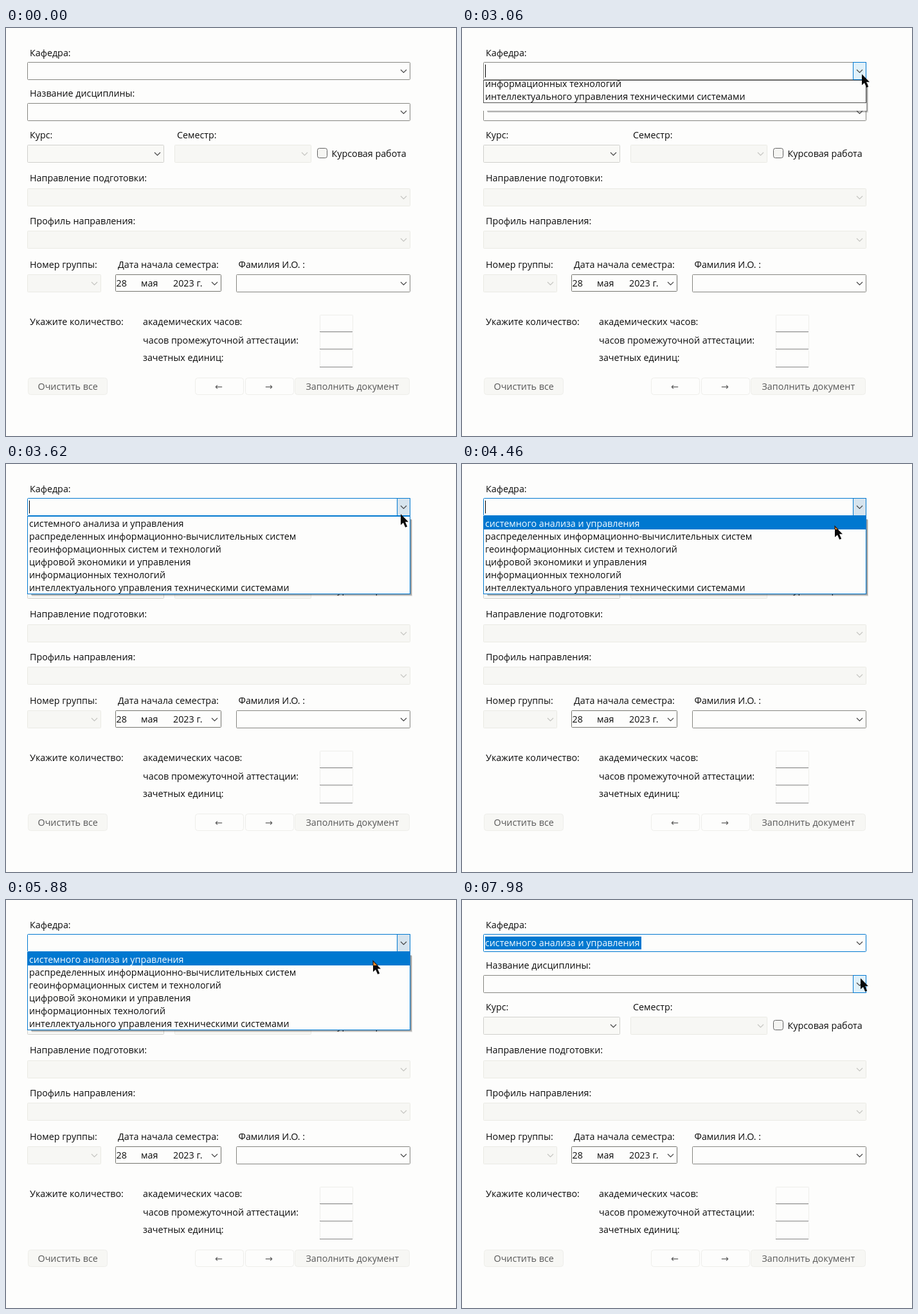
Recreate the animation shown at these times as an HTML page. Size 700x636 px, loop 8000 ms.

```html
<!DOCTYPE html>
<html lang="ru">
<head>
<meta charset="utf-8">
<style>
  html, body { margin: 0; width: 100%; height: 100%; overflow: hidden; background: #fdfdfc; }
  svg { display: block; width: 700px; height: 636px; }
  text { font: 14.3px "Open Sans", "Noto Sans", "DejaVu Sans", sans-serif; fill: #0c0c0c; white-space: pre; }
  .dim { fill: #585858; }
  .inv { fill: #f6fbff; }
</style>
</head>
<body>
<svg id="stage" viewBox="0 0 700 636" xmlns="http://www.w3.org/2000/svg"></svg>
<script>
const LOOP = 8000;
const BG = '#fdfdfc', PALE = '#f7f7f4', EDGE = '#858580', BLUE = '#0078d0', MARK = '#404040';
const stage = document.getElementById('stage');

function set(el, attrs) {
  for (const k in attrs) el.setAttribute(k, attrs[k]);
}
function add(tag, attrs = {}, parent = stage) {
  const el = document.createElementNS('http://www.w3.org/2000/svg', tag);
  set(el, attrs);
  parent.appendChild(el);
  return el;
}
function show(el, on) { el.style.display = on ? '' : 'none'; }
function label(str, x, y, parent = stage, cls = '') {
  const el = add('text', { x, y, class: cls }, parent);
  el.textContent = str;
  return el;
}
// Pixel-aligned outlined box
function box(x, y, w, h, stroke, fill, rx = 1, parent = stage) {
  return add('rect', { x: x + .5, y: y + .5, width: w - 1, height: h - 1, rx, stroke, fill }, parent);
}
function chevron(cx, cy, stroke = MARK) {
  add('path', { d: `M${cx - 4.5} ${cy - 2}l4.5 4.5l4.5 -4.5`, fill: 'none', stroke, 'stroke-width': 1.1 });
}
function combo(x, y, w, kind) {
  const [stroke, fill, mark] = {
    on: [EDGE, BG, MARK],
    flat: ['#d0d0cc', '#f9f9f6', MARK],
    off: ['#eaeae4', PALE, '#c4c4c0'],
  }[kind];
  const frame = box(x, y, w, 28, stroke, fill);
  const hot = kind === 'on' && box(x + w - 21, y, 21, 28, BLUE, '#e0f1fa', 0);
  if (hot) hot.style.opacity = 0;
  chevron(x + w - 10.5, y + 14, mark);
  return { frame, hot };
}
function button(str, x, w, tx, fill) {
  box(x, 545, w, 27, '#eeeeea', fill, 4);
  label(str, tx, 564, stage, 'dim');
}

// Form
[['Кафедра:', 37, 44], ['Название дисциплины:', 37, 107], ['Курс:', 37, 172],
 ['Семестр:', 266, 172], ['Курсовая работа', 506.5, 201], ['Направление подготовки:', 37, 239],
 ['Профиль направления:', 37, 306], ['Номер группы:', 37, 374],
 ['Дата начала семестра:', 174, 374], ['Фамилия И.О. :', 361.5, 374],
 ['Укажите количество:', 37, 463], ['академических часов:', 213, 463],
 ['часов промежуточной аттестации:', 213, 492], ['зачетных единиц:', 213, 519],
].forEach(a => label(...a));

const dept = combo(33, 53, 596, 'on');
const subject = combo(33, 117, 596, 'on');
combo(33, 182, 213, 'flat');
combo(262, 182, 213, 'off');
box(484, 187, 16, 16, '#626262', '#f6f6f3', 3);
combo(33, 250, 596, 'off');
combo(33, 316, 596, 'off');
combo(33, 384, 115, 'off');
box(170, 384, 165, 27, '#74746e', BG);
label('28', 171.5, 403);
label('мая', 210, 403);
label('2023 г.', 260, 403);
chevron(324.5, 398);
combo(358, 384, 271, 'on');
for (const y of [447, 474, 502]) {
  box(488, y, 52, 27, '#ededea', BG);
  add('path', { d: `M488 ${y + 26.5}h51`, stroke: '#868686' });
}
button('Очистить все', 34, 124, 49.5, PALE);
button('←', 294, 76, 325, BG);
button('→', 372, 76, 403, BG);
button('Заполнить документ', 449, 179, 466.5, PALE);

// Editable part of the first combo
const items = ['системного анализа и управления', 'распределенных информационно-вычислительных систем',
  'геоинформационных систем и технологий', 'цифровой экономики и управления',
  'информационных технологий', 'интеллектуального управления техническими системами'];
const caret = add('rect', { x: 36, y: 57, width: 1, height: 20, fill: '#000' });
const picked = add('g');
add('rect', { x: 36, y: 57, width: 243, height: 20, fill: BLUE }, picked);
label(items[0], 36, 72, picked, 'inv');

// Drop-down list
const LIST_H = 122;
const drop = add('g');
const shades = [[40, 87, 592, .18], [39, 86, 592, .38]].map(([x, y, width, opacity]) =>
  add('rect', { x, y, width, fill: '#404040', opacity }, drop));
const backing = add('rect', { x: 33, y: 81, width: 596, fill: BG }, drop);
const panel = box(33, 81, 596, LIST_H, BLUE, BG, 0, drop);
const clip = add('clipPath', { id: 'reveal' }, drop);
const clipRect = add('rect', { x: 34, y: 82, width: 594 }, clip);
const view = add('g', { 'clip-path': 'url(#reveal)' }, drop);
const rows = add('g', {}, view);
const bar = add('rect', { x: 34, width: 594, height: 20, fill: BLUE }, rows);
const rowText = items.map((s, i) => label(s, 36, 98 + 20 * i, rows));

// Pointer inverts whatever lies below: black on white, orange on blue
const ARROW = 'M0 0V17L4 13.4L7.2 20.8L10.2 19.5L7 12.3H12Z';
const pointer = add('path', { d: ARROW, fill: '#080808' });
const barClip = add('clipPath', { id: 'bar' });
const barRect = add('rect', { x: 34, width: 594, height: 20 }, barClip);
const tintBox = add('g', { 'clip-path': 'url(#bar)' });
const tint = add('path', { d: ARROW, fill: '#fa8c28', stroke: '#2c2018', 'stroke-width': 1.2 }, tintBox);

// time, x, y
const path = [
  [720, 680, 12], [960, 655, 18], [1240, 612, 34], [1400, 594, 42], [1520, 602, 47],
  [1660, 617, 68], [1960, 623, 71], [2120, 623, 71], [2380, 623, 67], [2820, 623, 67],
  [3060, 622, 72], [3400, 620, 74], [3620, 614, 78], [3900, 598, 88], [4360, 580, 97],
  [4460, 580, 97], [4600, 575, 106], [4780, 573, 111], [4920, 573, 111], [5030, 571, 115],
  [5180, 569, 99], [5340, 571, 95], [6980, 571, 95], [7160, 575, 100], [7460, 598, 134],
  [7700, 616, 130], [7860, 621, 123], [7980, 620, 122],
];
function at(t) {
  const i = path.findIndex(p => p[0] > t);
  if (i === 0) return path[0].slice(1);
  if (i < 0) return path[path.length - 1].slice(1);
  const [a, b] = [path[i - 1], path[i]];
  const k = (t - a[0]) / (b[0] - a[0]);
  return [a[1] + (b[1] - a[1]) * k, a[2] + (b[2] - a[2]) * k];
}
const ramp = (t, a, b) => Math.min(1, Math.max(0, (t - a) / (b - a)));
const OPEN = 3002, CLOSE = 6340;

function draw(t) {
  const [x, y] = at(t).map(Math.round);
  const open = t >= OPEN && t < CLOSE;
  const chosen = t >= CLOSE;
  const focused = t >= 3100;

  set(dept.frame, { stroke: focused ? BLUE : EDGE });
  dept.hot.style.opacity = ramp(t, 1680, 1960) * (1 - ramp(t, 6620, 7100));
  set(dept.hot, { fill: t > 3240 && !chosen ? '#d6e4ee' : '#e0f1fa' });
  subject.hot.style.opacity = ramp(t, 7660, 7920);

  const blinkOn = t < 3720 || Math.floor((t - 3720) / 535) % 2 === 1;
  show(caret, t >= 2840 && !chosen && blinkOn);
  show(picked, chosen);

  // The window grows a little ahead of its sliding contents
  show(drop, open);
  const h = Math.max(2, Math.round(LIST_H * ramp(t, OPEN, OPEN + 200)));
  const outer = Math.min(LIST_H, h + 12);
  set(backing, { height: outer });
  set(panel, { height: h - 1, stroke: focused ? BLUE : '#505050' });
  shades.forEach((s, i) => set(s, { height: outer - 3 - i * .5 }));
  set(clipRect, { height: h - 2 });
  set(rows, { transform: `translate(0 ${h - LIST_H})` });

  // Highlight trails the pointer slightly
  const hoverY = at(t - 40)[1];
  const row = open && t > 3620 && hoverY >= 82 ? Math.floor((hoverY - 82) / 20) : -1;
  show(bar, row >= 0);
  set(bar, { y: 82 + 20 * row });
  rowText.forEach((el, i) => el.classList.toggle('inv', i === row));

  const place = { transform: `translate(${x} ${y})` };
  show(pointer, t >= 720);
  set(pointer, place);
  show(tintBox, row >= 0);
  set(barRect, { y: 82 + 20 * row });
  set(tint, place);
}

const start = performance.now();
function tick(now) {
  draw(Math.max(0, now - start) % LOOP);
  requestAnimationFrame(tick);
}
draw(0);
requestAnimationFrame(tick);
</script>
</body>
</html>
```
